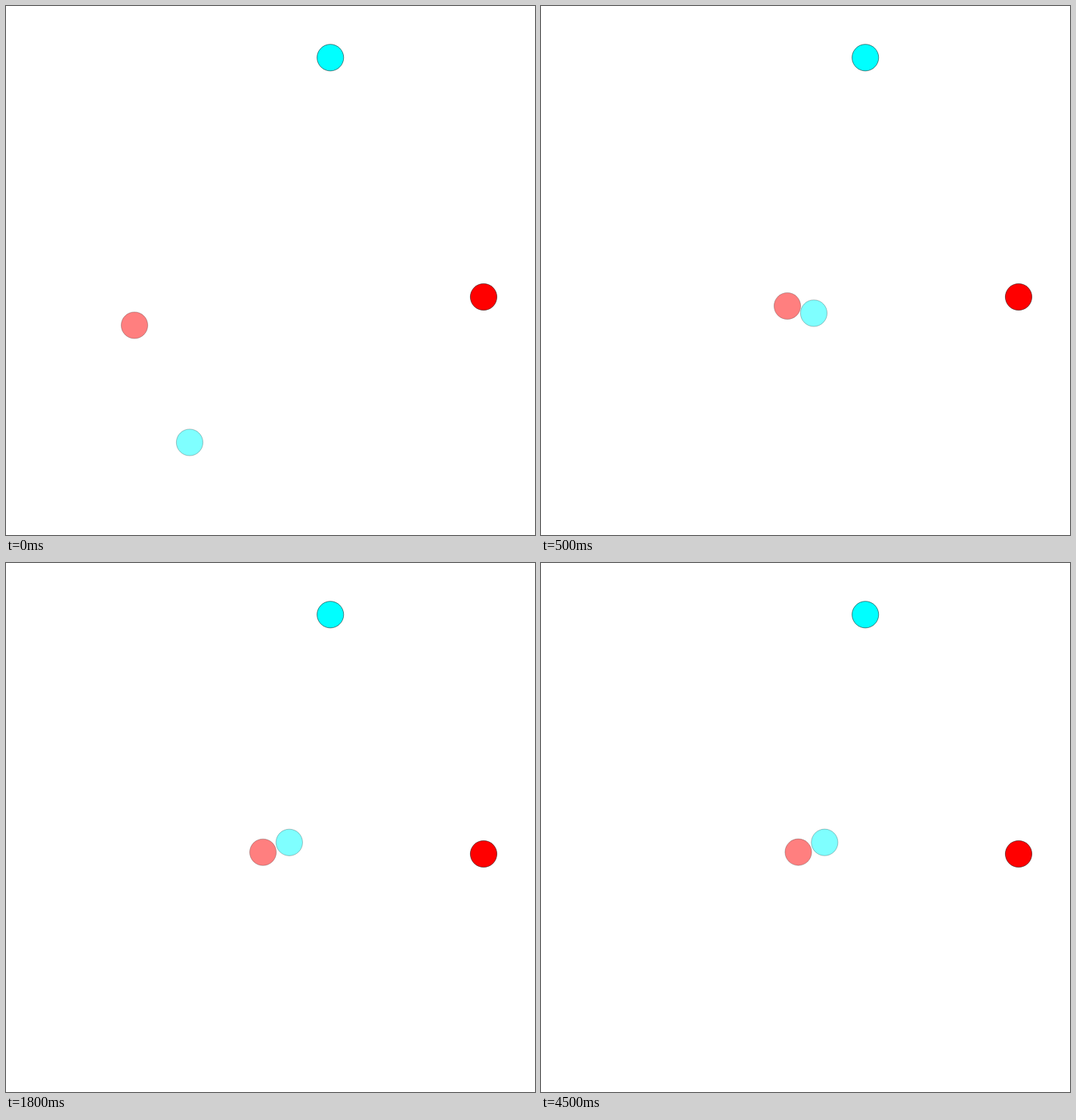
Animation, 700 px wide and 700 px high, one loop 6.1 s. Source, as an HTML page with a canvas:

```html
<!DOCTYPE html>
<html lang="en">
<head>
<meta charset="utf-8">
<title>Moving discs</title>
<style>
html, body { margin: 0; width: 100%; height: 100%; overflow: hidden; background: #fff; }
canvas { display: block; }
</style>
</head>
<body>
<canvas id="stage" width="700" height="700"></canvas>
<script>
const ctx = document.getElementById('stage').getContext('2d');
const LOOP = 6100, STEP = 100, REST = 3400, RADIUS = 17.6;
const CONTACT = 5;               // step at which the moving discs touch
const DAMPING = 0.35, SWING = 0.36;

const fixed = [
  { color: '#f00', pos: [632, 385] },
  { color: '#0ff', pos: [429.2, 68.3] }
];
const moving = [
  { color: '#f00', start: [170, 422.5], speed: [34.78, -4.52], accel: [-0.717, -0.117],
    end: [340.5, 382.6], push: [43, -14.6] },
  { color: '#0ff', start: [243, 577.5], speed: [18.18, -36.37], accel: [1.083, 0.433],
    end: [375.3, 369.7], push: [43.9, -9.7] }
];

const approach = (d, s) => d.start.map((p, k) => p + d.speed[k] * s + d.accel[k] * s * s);

// Damped swing around the resting place
function settle(d, u) {
  const touch = approach(d, CONTACT), fade = Math.exp(-DAMPING * u);
  const c = Math.cos(SWING * u), s = Math.sin(SWING * u);
  return d.end.map((p, k) => p + fade * ((touch[k] - p) * c + d.push[k] * s));
}

const place = (d, s) => s < CONTACT ? approach(d, s) : settle(d, s - CONTACT);

function disc([x, y], color, alpha) {
  ctx.globalAlpha = alpha;
  ctx.beginPath();
  ctx.arc(x, y, RADIUS, 0, 2 * Math.PI);
  ctx.fillStyle = color;
  ctx.fill();
  ctx.strokeStyle = '#000';
  ctx.lineWidth = 0.5;
  ctx.stroke();
}

function draw(now) {
  const step = Math.floor(Math.min(now % LOOP, REST) / STEP);
  ctx.globalAlpha = 1;
  ctx.fillStyle = '#fff';
  ctx.fillRect(0, 0, 700, 700);
  for (const d of fixed) disc(d.pos, d.color, 1);
  for (const d of moving) disc(place(d, step), d.color, 0.5);
}

let start;
function tick(now) {
  start ??= now;
  draw(now - start);
  requestAnimationFrame(tick);
}
draw(0);
requestAnimationFrame(tick);
</script>
</body>
</html>
```
